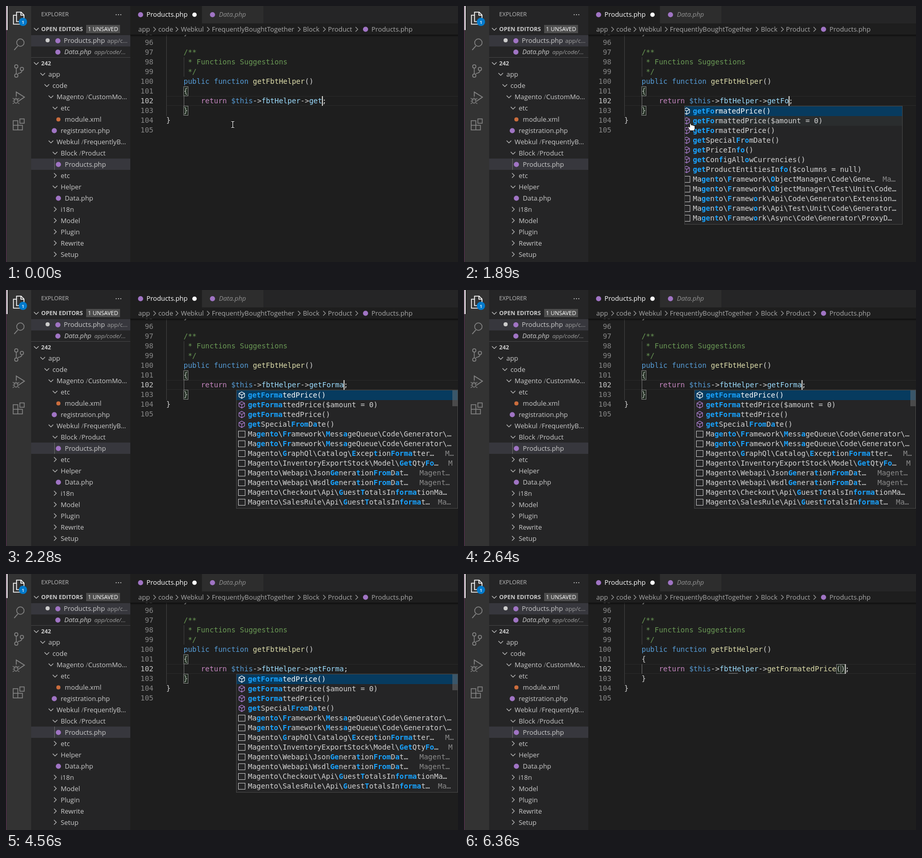
Recreate the animation shown at these times as an HTML page. Size 880 by 500 pixels, loop 6.48 s.

```html
<!DOCTYPE html>
<html lang="en">
<head>
<meta charset="utf-8">
<title>Code completion</title>
<style>
html, body { margin: 0; width: 100%; height: 100%; overflow: hidden; background: #1e1e1e; }
svg { display: block; }
text { white-space: pre; }
.ui { font-family: "Open Sans", "Noto Sans", sans-serif; font-size: 12.85px; }
.mono { font-family: "DejaVu Sans Mono", monospace; font-size: 14px; }
.line { fill: none; stroke-width: 1.5; }
</style>
</head>
<body>
<svg id="stage" width="880" height="500" viewBox="0 0 880 500"></svg>
<script>
const LOOP = 6480, CW = 8.428, LEFT = 312, ROW = 19;
const C = {
  text: '#d4d4d4', side: '#cccccc', dim: '#a0a0a0', grey: '#858585', comment: '#6a9955',
  key: '#569cd6', flow: '#c586c0', prop: '#9cdcfe', func: '#dcdcaa', hit: '#18a3ff', php: '#a074c4'
};
const rowTop = n => 62 + ROW * (n - 96);
const col = n => LEFT + CW * n;

const rect = (x, y, w, h, fill, more = '') =>
  `<rect x="${x}" y="${y}" width="${w}" height="${h}" fill="${fill}" ${more}/>`;
const dot = (x, y, r, fill) => `<circle cx="${x}" cy="${y}" r="${r}" fill="${fill}"/>`;
const path = (d, stroke, w = 1, more = '') =>
  `<path d="${d}" fill="none" stroke="${stroke}" stroke-width="${w}" ${more}/>`;
const ui = (x, y, s, fill = C.side, more = '') =>
  `<text class="ui" x="${x}" y="${y}" fill="${fill}" ${more}>${s}</text>`;
const mono = (x, y, s, fill = C.text, more = '') =>
  `<text class="mono" x="${x}" y="${y}" fill="${fill}" ${more}>${s}</text>`;
const span = (s, fill) => `<tspan fill="${fill}">${s}</tspan>`;
const down = (x, y) => path(`M${x - 4.5} ${y - 2}l4.5 4.5l4.5 -4.5`, '#c5c5c5', 1.1);
const right = (x, y, c = '#c5c5c5') => path(`M${x - 2} ${y - 4.5}l4.5 4.5l-4.5 4.5`, c, 1.1);
const fileMark = (x, y) => dot(x, y, 5, C.php);
const italic = 'font-style="italic"';

function activityBar() {
  const g = C.grey;
  const files = path('M20.5 12h9l5.5 5.5v13h-14.5zM29 12v6h6M20 18h-5.500v17.500h14v-4', '#fff', 1.6);
  const search = path('M16 86l7 -8', g, 1.8) + `<circle class="line" cx="28" cy="71.500" r="7.200" stroke="${g}"/>`;
  const ring = (x, y) => `<circle class="line" cx="${x}" cy="${y}" r="3.200" stroke="${g}"/>`;
  const branch = ring(20, 118) + ring(31, 123) + ring(20, 136) +
    path('M20 121.500v11M31 126.500c0 4 -4 4.500 -8 5.500', g, 1.5);
  const debug = path('M20 177v-9l16 10l-10.500 7', g, 1.6) +
    `<ellipse class="line" cx="19.500" cy="185" rx="3.600" ry="4.800" stroke="${g}"/>` +
    path('M16 183h7M13 180l3 2M13 186h3M13 191l3 -2M26 180l-3 2M26 186h-3M26 191l-3 -2', g, 1.2);
  const ext = path('M14 224h9v9h9v9h-18zM14 233h9v9', g, 1.5) + path('M27 220.500h8.500v8.500h-8.500z', g, 1.5);
  return rect(0, 0, 49, 500, '#333') + rect(0, 0, 1, 500, '#5a2a50') + rect(1, 0, 2, 47, '#fff') +
    files + dot(33, 31, 8, '#007acc') +
    ui(33, 34.5, '1', '#fff', 'text-anchor="middle" style="font-size:9px;font-weight:600"') +
    search + branch + debug + ext;
}

function sideBar() {
  const small = 'style="font-size:11.2px"', bold = 'style="font-size:11.2px;font-weight:700"';
  let s = rect(49, 0, 193, 500, '#252526') + rect(49, 57, 193, 22, '#37373d') + rect(49, 298, 193, 22, '#37373d');
  s += ui(68.5, 20, 'EXPLORER', '#bbb', small) + [214.5, 219, 223.5].map(x => dot(x, 17, 1, C.side)).join('');
  s += down(59, 45) + ui(68.5, 49, 'OPEN EDITORS', C.side, bold);
  s += rect(156, 37, 66, 16, '#4d4d4d') + ui(159.500, 49, '1 UNSAVED', '#fff', 'style="font-size:11px"');
  s += dot(81, 67, 4, C.side) + fileMark(101, 68) + ui(112.5, 72, 'Products.php') +
    ui(197, 72, 'app/c…', C.dim, 'style="font-size:11.6px"');
  s += fileMark(101, 90) + ui(113.5, 94, 'Data.php', C.side, italic) +
    ui(172, 94, 'app/code/…', C.dim, italic + ' style="font-size:11.6px"');
  s += rect(49, 100, 193, 1, '#434344') + down(59, 112) + ui(68.5, 116, '242', C.side, bold);

  // depth, label, kind: v open folder, > closed folder, p code file, x markup file
  const tree = [
    [0, 'app', 'v'], [1, 'code', 'v'], [2, 'Magento/CustomMo…', 'v'], [3, 'etc', 'v'], [4, 'module.xml', 'x'],
    [3, 'registration.php', 'p'], [2, 'Webkul/FrequentlyB…', 'v'], [3, 'Block/Product', 'v'],
    [4, 'Products.php', 'p'], [3, 'etc', '>'], [3, 'Helper', 'v'], [4, 'Data.php', 'p'],
    [3, 'i18n', '>'], [3, 'Model', '>'], [3, 'Plugin', '>'], [3, 'Rewrite', '>'], [3, 'Setup', '>']
  ];
  tree.forEach(([depth, label, kind], i) => {
    const x = 82.5 + 8 * depth, y = 133 + 22 * i;
    if (kind === 'v') s += down(x - 11, y);
    else if (kind === '>') s += right(x - 11, y);
    else if (kind === 'p') s += fileMark(x - 12.5, y + 0.5);
    else s += dot(x - 12.500, y + 0.5, 4, '#cc6d3d');
    s += ui(x, y + 5, label.replace('/', '<tspan dx="3.500" fill="#888">/</tspan><tspan dx="2.500"></tspan>'));
  });
  return s + rect(94, 298, 1, 22, '#6a6a6a');
}

function header() {
  let s = rect(242, 0, 638, 34, '#252526') + rect(242, 0, 139, 34, '#1e1e1e') + rect(382, 0, 119, 34, '#2d2d2d');
  s += fileMark(262, 17) + ui(273.5, 21, 'Products.php', '#fff') + dot(367, 17, 4.300, '#fff');
  s += fileMark(402, 17) + ui(414.5, 21, 'Data.php', '#919191', italic);
  s += rect(242, 34, 638, 22, '#1e1e1e');
  [[257.5, 'app'], [296.5, 'code'], [340.5, 'Webkul'], [400.7, 'FrequentlyBoughtTogether'], [578, 'Block'],
   [626.800, 'Product'], [711.500, 'Products.php']].forEach(([x, t]) => s += ui(x, 50, t, '#a9a9a9'));
  [289, 332.5, 393.5, 570.5, 619.5, 682.5].forEach(x => s += right(x, 45.5, '#a0a0a0'));
  s += fileMark(700, 45.5);
  for (let i = 0; i < 4; i++) s += rect(242, 56 + i, 638, 1, '#000', `opacity="${0.5 - 0.12 * i}"`);
  return s;
}

function code() {
  const line = (n, c, s, fill) => mono(col(c), rowTop(n) + 14, s, fill);
  let s = rect(242, 34, 638, 466, '#1e1e1e');
  s += rect(LEFT, 176, 568, 1, '#292929') + rect(LEFT, 194, 568, 1, '#292929');
  s += rect(312, 56, 1, 159, '#404040') + rect(346, 100, 1, 38, '#404040') + rect(346, 176, 1, 19, '#707070');
  for (let n = 95; n <= 105; n++)
    s += mono(287, rowTop(n) + 14, n, n === 102 ? '#c6c6c6' : C.grey, 'text-anchor="end"');
  s += line(95, 4, '}') + line(97, 4, '/**', C.comment) + line(98, 5, '* Functions Suggestions', C.comment) +
    line(99, 5, '*/', C.comment);
  s += line(100, 4, span('public function ', C.key) + span('getFbtHelper', C.func) + '()');
  return s + line(101, 4, '{') + line(103, 4, '}') + line(104, 0, '}');
}

const matchBox = (c, n) =>
  rect(col(c) + 0.3, rowTop(n) + 0.5, CW, 18, '#006400', 'fill-opacity=".1" stroke="#888"');

// asterisks toggle the matched letters; a bar starts the right-hand detail
function popup(p) {
  const { x, w, textX, rows, hover, bar } = p;
  let s = rect(0, 0, w, 232, '#252526') + rect(0, 1, w, ROW, '#073b5f');
  if (hover) s += rect(0, 20, w, ROW, '#2a2d2e');
  rows.forEach((r, i) => {
    const mid = 10 + ROW * i, tx = textX - x, ix = tx - 12;
    const [label, detail, dx] = r.split('|');
    if (label.startsWith('Magento') || label.startsWith('Ma*'))
      s += rect(ix - 6.5, mid - 5.5, 13, 12, 'none', 'stroke="#c0c0c0"');
    else
      s += path(`M${ix} ${mid - 6}l5.500 3v6.500l-5.500 3l-5.500 -3v-6.500zM${ix - 5.5} ${mid - 3}l5.500 3l5.500 -3M${ix} ${mid}v6.500`,
        i ? '#b180d7' : '#fff', 1.1);
    const parts = label.split('*').map((t, k) =>
      k % 2 ? `<tspan fill="${C.hit}" font-weight="700">${t}</tspan>` : t).join('');
    s += mono(tx, mid + 5, parts, i ? C.text : '#fff');
    if (detail) s += mono(dx - x, mid + 5, detail, '#8c8c8c');
  });
  if (bar) s += rect(w - 11, 1, 10, bar, '#797979', 'opacity=".45"');
  s += rect(0.5, 0.5, w - 1, 231, 'none', 'stroke="#454545"');
  return `<svg x="${x}" y="195" width="${w}" height="232" overflow="hidden">${s}</svg>`;
}

const lines = s => s.trim().split('\n');
const listFo = lines(String.raw`
*getFo*rmatedPrice()
*getFo*rmattedPrice($amount = 0)
*getFo*rmattedPrice()
*get*Special*F*r*o*mDate()
*get*PriceIn*fo*()
*get*Con*f*igAll*o*wCurrencies()
*get*ProductEntitiesIn*fo*($columns = null)
Ma*ge*n*t*o\*F*ramework\*O*bjectManager\Code\Gene…|Ma…|815
Ma*ge*n*t*o\*F*ramework\*O*bjectManager\Test\Unit\Code…
Ma*ge*n*t*o\*F*ramew*o*rk\Api\Code\Generator\Extension…
Ma*ge*n*t*o\*F*ramew*o*rk\Api\Test\Unit\Code\Generator…
Ma*ge*n*t*o\*F*ramew*o*rk\Async\Code\Generator\ProxyD…`);
const listForm = lines(String.raw`
*getForm*atedPrice()
*getForm*attedPrice($amount = 0)
*getForm*attedPrice()
*get*Special*From*Date()
Ma*ge*n*to*\*Fr*a*m*ework\GraphQl\Exception\Excep…|Ma…|832
Ma*ge*n*to*\*Fr*amework\*M*essageQueue\Code\Generator\…
Ma*ge*n*to*\*Fr*amework\*M*essageQueue\Code\Generator\…
Magento\InventorySales\Model\*Get*Sku*Fr*…|Magen…|801
Magento\Webapi\Json*Ge*nera*t*ion*From*Dat…|Magent…|796
Magento\Webapi\Wsdl*Ge*nera*t*ion*From*Dat…|Magent…|796
Magento\*G*raphQl\Catalog\*E*xcep*t*ion*Form*atter…|M…|847
Magento\Sales\Block\Wid*get*\Gue…|Magento\Sale…|745`);
const listForma = lines(String.raw`
*getForma*tedPrice()
*getForma*ttedPrice($amount = 0)
*getForma*ttedPrice()
*get*Special*From*D*a*te()
Ma*ge*n*to*\*Fr*amework\*M*ess*a*geQueue\Code\Generator\…
Ma*ge*n*to*\*Fr*amework\*M*ess*a*geQueue\Code\Generator\…
Magento\*G*raphQl\Catalog\*E*xcep*t*ion*Forma*tter…|M…|855
Magento\InventoryExportStock\Model\*Get*Qty*Fo*…|M|861
Magento\Webapi\Json*Ge*nera*t*ion*From*D*a*t…|Magent…|805
Magento\Webapi\Wsdl*Ge*nera*t*ion*From*D*a*t…|Magent…|805
Magento\Checkout\Api\*G*uest*T*otalsIn*forma*tionMa…
Magento\SalesRule\Api\*G*uest*T*otalsIn*forma*t…|Ma…|841`);

const popups = [
  { from: 1830, to: 1920, x: 429, w: 425, textX: 445.5, rows: listFo, hover: true },
  { from: 1920, to: 1980, x: 431, w: 432, textX: 454, rows: listForm, hover: true, bar: 20 },
  { from: 1980, to: 2220, x: 439, w: 432, textX: 462.5, rows: listForm, hover: true, bar: 20 },
  { from: 2220, to: 5640, x: 448, w: 432, textX: 471, rows: listForma, bar: 31 }
];

// time, typed word, start of the caret's blink
const typing = [
  [0, 'get', 0], [1350, 'getF', 1350], [1800, 'getFo', 1800], [1920, 'getFor', 1920],
  [1980, 'getForm', 1980], [2220, 'getForma', 2220], [5640, 'getFormatedPrice()', 5460]
];
const BLINK = 900, DONE = 5640;

const beam = path('M438.500 225.500h2l1 1l1 -1h2M441.500 226v11M438.500 237.500h2l1 -1l1 1h2', '#000', 2.600) +
  path('M438.500 225.500h2l1 1l1 -1h2M441.500 226v11M438.500 237.500h2l1 -1l1 1h2', '#eee', 1.2);
const hand = '<path d="M439.500 230v7l-2 -1.500l-1.500 1.500l4 6.500h8l1.500 -4v-5l-2 -1l-2 -.5l-2 -.5l-1.500 -.2v-2.300q-1.200 -1.500 -2.500 0z" fill="#fff" stroke="#111"/>';

const tagged = (id, s) => `<g id="${id}">${s}</g>`;
const $ = id => document.getElementById(id);

$('stage').innerHTML = code() +
  tagged('outer', matchBox(4, 101) + matchBox(4, 103)) +
  tagged('inner', matchBox(49, 102) + matchBox(50, 102) + rect(515, 193.5, 18, 1, '#8a8a8a')) +
  mono(col(8), 190, '', C.text, 'id="typed"') +
  rect(0, 176, 2, ROW, '#d0d0cc', 'id="caret"') +
  header() + sideBar() + activityBar() +
  popups.map((p, i) => tagged('popup' + i, popup(p))).join('') +
  tagged('beam', beam) + tagged('hand', hand);

const show = (id, on) => $(id).style.display = on ? '' : 'none';
let lastWord = '';

function draw(t) {
  const [, word, blink] = typing.filter(k => k[0] <= t).pop();
  const done = t >= DONE;
  if (word !== lastWord) {
    const call = done ? span(word.slice(0, -2), C.func) + '()' : span(word, C.prop);
    $('typed').innerHTML = span('return ', C.flow) + span('$this', C.key) + '-&gt;' +
      span('fbtHelper', C.prop) + '-&gt;' + call + ';';
    $('caret').setAttribute('x', col(33 + word.length) - 0.4);
    lastWord = word;
  }
  show('caret', (t - blink) % BLINK < BLINK / 2);
  show('outer', !done);
  show('inner', done);
  popups.forEach((p, i) => show('popup' + i, t >= p.from && t < p.to));
  show('beam', t < 1830);
  show('hand', t >= 1830 && t < 2220);
}

const start = performance.now();
function tick() {
  draw((performance.now() - start) % LOOP);
  requestAnimationFrame(tick);
}
tick();
</script>
</body>
</html>
```
